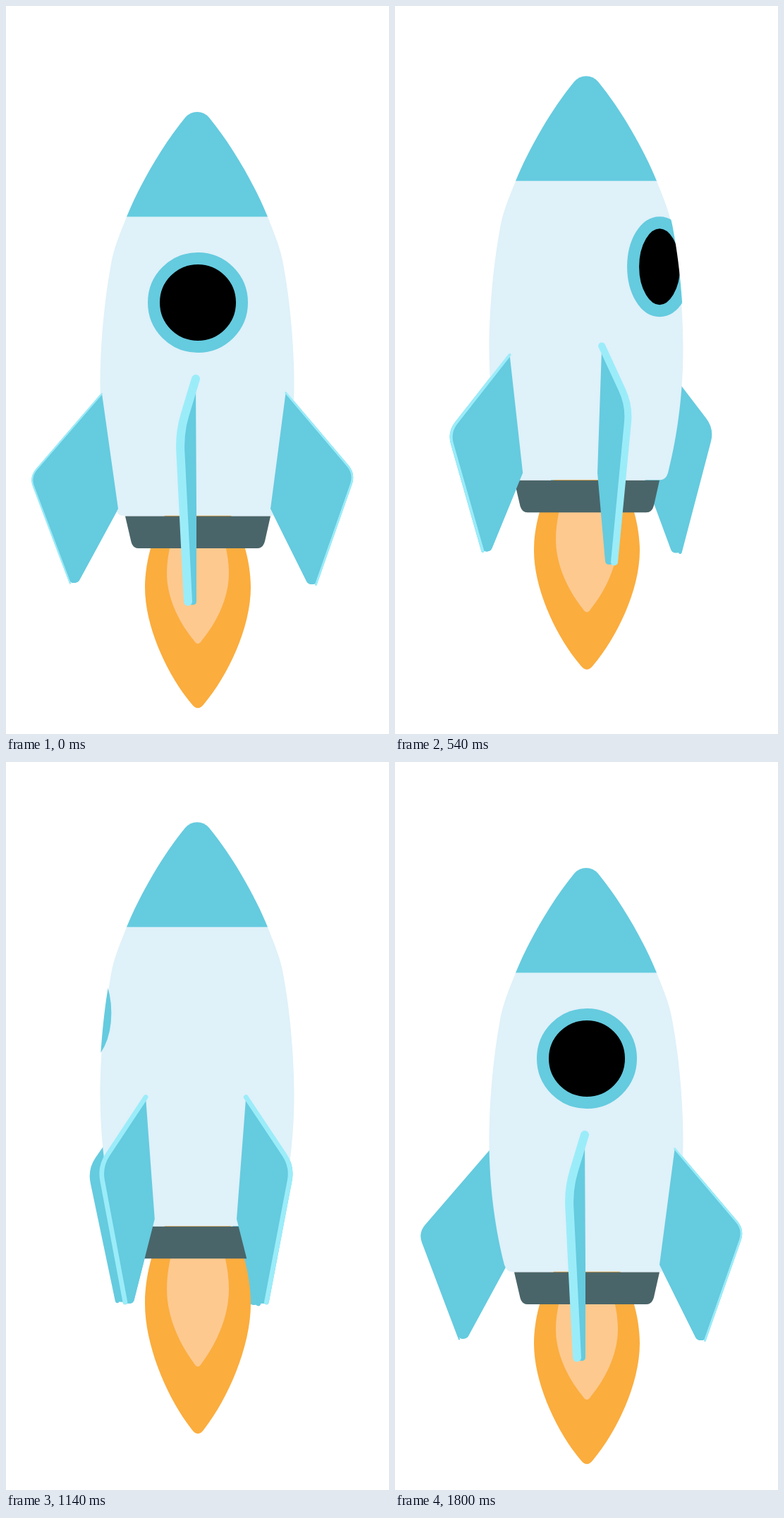
Animation of 543x1031 px, one loop 1830 ms. Source, as an HTML page:

```html
<!DOCTYPE html>
<html lang="en">
<head>
<meta charset="utf-8">
<title>Rocket</title>
<style>
  html, body { margin: 0; width: 100%; height: 100%; overflow: hidden; background: #fff; }
  svg { display: block; width: 100%; height: 100%; }
  .fin { fill: #65cbdf; }
  .edge { fill: none; stroke: #9becf9; stroke-linecap: round; stroke-linejoin: round; }
  #backFins .edge { stroke: #65cbdf; }
  .soft { filter: blur(.6px); }
</style>
</head>
<body>
<svg viewBox="0 0 543 1031">
  <defs>
    <path id="hull" d="M171 298.5C162 322 152 343 148 371C138 425 133.500 490 133.500 535
      C133.500 605 143 665 155 712Q158 722 167 722H375Q384 722 387 712
      C399 665 408.500 605 408.500 535C408.500 490 404 425 394 371C390 343 380 322 371 298.500Z"/>
    <clipPath id="inside">
      <use href="#hull" transform="translate(271 0) scale(1.008 1) translate(-271 0)"/>
    </clipPath>
  </defs>
  <g id="rocket">
    <g id="backFins"></g>
    <use href="#hull" fill="#dff1f9"/>
    <path class="soft" fill="#65cbdf" d="M171 298.500C190 252 222 197 254 158
      Q261 150 271 150Q281 150 288 158C320 197 352 252 371 298.500Z"/>
    <g clip-path="url(#inside)">
      <ellipse id="port" class="soft" cy="420" ry="62.5" stroke="#65cbdf" stroke-width="17"/>
    </g>
    <path id="flame" fill="#fbad3e" d="M225 -.2C207 28 197 68 197 101C197 158 230 226 263 265
      Q272 277 281 265C314 226 347 158 347 101C347 68 337 28 319 -.2Z"/>
    <path id="core" fill="#fdc98f" d="M247 1C236 25 228 55 228 81C228 118 247 153 266 176
      Q272 186 278 176C297 153 316 118 316 81C316 55 308 25 297 1Z"/>
    <path fill="#4a6569" d="M169 722.500H375L367 758Q364.500 768 356 768H188Q180 768 177.500 759Z"/>
    <g id="frontFins"></g>
  </g>
</svg>
<script>
const LOOP = 1830, STEP = 30, TURN = 1800, QUARTER = 450;
const $ = id => document.getElementById(id);

// Fin corners: root top, outer, tip outside, tip inside, root bottom; then edge width.
const LEFT = [136, 549, 34, 667, 91, 817, 102, 817, 159, 712, 2];
const MID_LEFT = [269, 528, 246, 604, 258, 848, 270, 848, 270, 712, 12];
const MID_RIGHT = [265, 528, 288, 604, 276, 848, 263, 848, 263, 712, 12];
const RIGHT = [406, 549, 509, 667, 451, 817, 440, 817, 383, 712, 2];
const SWEEPS = [[LEFT, MID_LEFT], [MID_RIGHT, RIGHT], [RIGHT, MID_RIGHT], [MID_LEFT, LEFT]];

// Times at which each fin passes the far left, for its front and back layers.
const FINS = [[0, 0], [450, 450], [930, 930], [1350, 1320]];

function addFin(parent) {
  const [body, edge] = ['fin', 'edge'].map(name => {
    const el = document.createElementNS('http://www.w3.org/2000/svg', 'path');
    el.setAttribute('class', name);
    return parent.appendChild(el);
  });
  return { body, edge };
}
const fins = FINS.map(([front, back]) => ({
  front, back,
  rear: addFin($('backFins')),
  face: addFin($('frontFins'))
}));

const smooth = x => x * x * (3 - 2 * x);
const pulse = t => {
  const x = ((t + QUARTER) % QUARTER) / (QUARTER / 2);
  return smooth(x < 1 ? x : 2 - x);
};

function pose(phase) {
  const i = phase === 0 ? 0 : Math.ceil(phase) - 1;
  const [from, to] = SWEEPS[i];
  return from.map((v, n) => v + (to[n] - v) * (phase - i));
}

function corner(a, v, b, r) {
  const toward = p => {
    const k = r / Math.hypot(p[0] - v[0], p[1] - v[1]);
    return [v[0] + (p[0] - v[0]) * k, v[1] + (p[1] - v[1]) * k];
  };
  return `L${toward(a)}Q${v} ${toward(b)}`;
}

function paint({ body, edge }, s) {
  const [top, out, tip, tipIn, root] = [0, 2, 4, 6, 8].map(i => [s[i], s[i + 1]]);
  const width = s[10];
  const start = `M${top}` + corner(top, out, tip, 12 + 1.2 * width);
  body.setAttribute('d', start + corner(out, tip, tipIn, 5) + corner(tip, tipIn, root, 5) + `L${root}Z`);
  edge.setAttribute('d', start + `L${tip[0]} ${tip[1] + 1.5 - width / 2}`);
  edge.setAttribute('stroke-width', width);
}

function drawFin({ front, back, rear, face }, t) {
  paint(rear, pose((t - back + TURN) % TURN / QUARTER));

  const phase = (t < front ? t - front + TURN : t - front) / QUARTER;
  const shown = phase <= 2;
  face.body.style.display = face.edge.style.display = shown ? '' : 'none';
  if (shown) paint(face, pose(phase));
}

function drawPort(t) {
  const leaving = t < 900, u = leaving ? t : TURN - t;
  $('port').style.display = t >= 900 && t < 1080 ? 'none' : '';
  $('port').setAttribute('cx', 272 + (leaving ? 0.191 : -0.246) * u);
  $('port').setAttribute('rx', Math.max(0, 62.5 - (leaving ? 0.0462 : 0.0474) * u));
}

const stretch = (id, k) => $(id).setAttribute('transform', `translate(0 722) scale(1 ${k})`);

function draw(t) {
  const x = t / 900;
  $('rocket').setAttribute('transform', `translate(0 ${-78.4 * smooth(x < 1 ? x : 2 - x)})`);
  stretch('flame', (267 + 30 * pulse(t - 60)) / 271);
  stretch('core', (181 + 18 * pulse(t)) / 181);
  drawPort(t);
  fins.forEach(fin => drawFin(fin, t));
}

function tick() {
  draw(Math.floor(performance.now() % LOOP / STEP) * STEP);
  requestAnimationFrame(tick);
}
tick();
</script>
</body>
</html>
```
